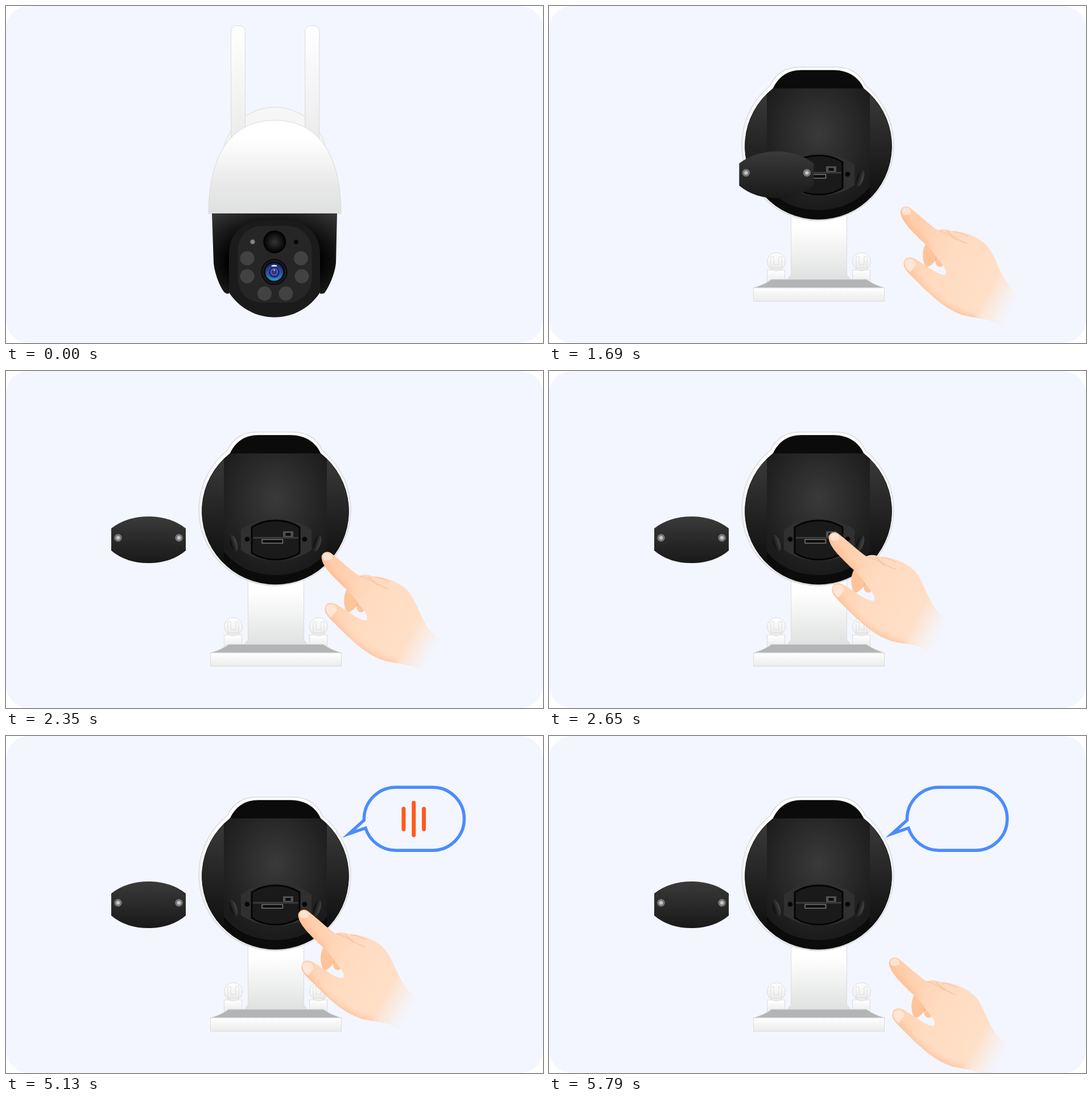
These frames come from a looping animation (944x593 px, 5.82 s). An HTML page:

```html
<!DOCTYPE html>
<html lang="en">
<head>
<meta charset="utf-8">
<title>Camera reset</title>
<style>
html, body { margin: 0; width: 100%; height: 100%; overflow: hidden; background: #fff; }
svg { display: block; width: 944px; height: 593px; }
</style>
</head>
<body>
<svg viewBox="0 0 944 593" fill="none">
  <defs>
    <linearGradient id="white" x2="0" y2="1"><stop stop-color="#fff"/><stop offset="1" stop-color="#ebebeb"/></linearGradient>
    <linearGradient id="dome" x2="0" y2="1"><stop offset=".2" stop-color="#fff"/><stop offset=".7" stop-color="#e8e8e8"/><stop offset="1" stop-color="#dfe1e0"/></linearGradient>
    <linearGradient id="hood" x2="0" y2="1"><stop offset=".3" stop-color="#fff"/><stop offset="1" stop-color="#ebebeb"/></linearGradient>
    <linearGradient id="neck" x2="0" y2="1"><stop offset=".2" stop-color="#fff"/><stop offset="1" stop-color="#dfe1e0"/></linearGradient>
    <linearGradient id="cover" x2="0" y2="1"><stop stop-color="#3a3a3a"/><stop offset="1" stop-color="#191919"/></linearGradient>
    <linearGradient id="side" x2="0" y2="1"><stop stop-color="#3b3b3b"/><stop offset=".9" stop-color="#0c0c0c"/></linearGradient>
    <linearGradient id="knob"><stop stop-color="#0b0b0b"/><stop offset="1" stop-color="#474747"/></linearGradient>
    <linearGradient id="screw"><stop stop-color="#8d8d8d"/><stop offset="1" stop-color="#dcdcdc"/></linearGradient>
    <linearGradient id="iris" x2="0" y2="1"><stop stop-color="#1d2460"/><stop offset=".5" stop-color="#27489a"/><stop offset="1" stop-color="#2b9ac8"/></linearGradient>
    <radialGradient id="shell" cy=".6" r=".8"><stop offset=".46" stop-color="#020202"/><stop offset="1" stop-color="#3c3c3c"/></radialGradient>
    <radialGradient id="glow"><stop offset=".3" stop-color="#2a2a2a"/><stop offset="1" stop-color="#2a2a2a" stop-opacity="0"/></radialGradient>
    <radialGradient id="sensor"><stop stop-color="#343434"/><stop offset="1" stop-color="#000"/></radialGradient>
    <radialGradient id="back" cy=".37" r=".62"><stop stop-color="#3a3a3a"/><stop offset="1" stop-color="#1b1b1b"/></radialGradient>
    <linearGradient id="skin" gradientUnits="userSpaceOnUse" x1="500" y1="350" x2="694" y2="453">
      <stop stop-color="#ffcfac"/><stop offset=".35" stop-color="#ffdbc0"/>
      <stop offset=".76" stop-color="#ffdfc7"/><stop offset="1" stop-color="#ffe6d4" stop-opacity="0"/>
    </linearGradient>
    <filter id="soft"><feGaussianBlur stdDeviation="5"/></filter>
    <clipPath id="inside"><path id="cavity" d="M394 145C404 124 420 113 444 113H500C524 113 544 124 553 145A129 129 0 1 1 394 145Z"/></clipPath>
    <path id="palm" d="M492 296C490 287 499 281 507 285C520 294 545 318 558 326C566 322 575 324 582 327C602 326 630 338 644 353C660 372 664 400 685 425L704 441L673 500C655 481 640 483 610 477C575 470 545 440 515 410C503 398 495 390 498 381C500 373 508 371 518 376C540 390 560 406 571 404C575 395 565 386 556 374C546 358 538 352 530 345C515 330 495 312 492 296Z"/>
    <clipPath id="palmClip"><use href="#palm"/></clipPath>
    <g id="lens">
      <circle r="22.5" fill="#101010" stroke="#000"/><circle r="20" stroke="#2b2b2b"/>
      <circle r="17" fill="#080b1a"/><circle r="15.500" fill="url(#iris)"/>
      <circle r="10.500" fill="#1f2d78" stroke="#3c68b8"/><circle r="5.500" fill="#2b2468" stroke="#7f6cc8" stroke-width="1.500"/>
      <circle r="3" fill="#2a3f9a"/><ellipse cy="-11" rx="5" ry="1.600" fill="#e9edff"/><circle cy="-3" r="1.200" fill="#d8ddff"/>
    </g>
  </defs>
  <rect width="944" height="593" rx="40" fill="#f3f6fe"/>
  <g id="front"></g>

  <g id="rear">
    <g stroke="#dadbde" fill="url(#white)">
      <path fill="url(#neck)" d="M425.500 365H523.500V473L531 482H418L425.500 473Z"/>
      <g id="bolt">
        <rect x="383.500" y="464.500" width="31" height="22"/><circle cx="399.500" cy="450" r="16"/>
        <path d="M390 441h5v14h9v-14h5v20h-19z"/>
      </g>
      <use href="#bolt" x="150"/>
      <path d="M359 496Q380 490 391 481H558Q570 490 590 496Z" fill="#b3b4b5"/>
      <rect x="359.500" y="496" width="230" height="23.500"/>
      <path stroke-width="1.500" d="M389 140C399 118 418 107.500 440 107.500H504C528 107.500 547 118 556 140A133.500 133.500 0 1 1 389 140Z"/>
    </g>
    <g clip-path="url(#inside)">
      <rect x="340" y="110" width="265" height="268" fill="#0b0b0b"/>
      <path d="M340 145H383V378H340ZM564 145H605V378H564Z" fill="url(#side)"/>
      <path d="M383 145H564V318Q530 359 473.500 359T383 318Z" fill="url(#back)"/>
    </g>
    <use href="#cavity" stroke="#000" stroke-opacity=".5"/>
    <ellipse rx="6" ry="15" transform="translate(400 303) rotate(-18)" fill="url(#knob)"/>
    <ellipse rx="6" ry="15" transform="translate(547 303) rotate(18)" fill="url(#knob)"/>
    <path d="M413 279Q440 259 475 259T537 279V315Q510 334 475 334T413 315Z" fill="#303030"/>
    <path d="M432 275Q450 263 474 263T516 275V320Q498 332 474 332T432 320Z" fill="#1a1a1a" stroke="#050505" stroke-width="3"/>
    <path d="M434 293.500H514" stroke="#383838" stroke-width="3"/>
    <rect x="450" y="296.500" width="36.500" height="6.500" fill="#0c0c0c" stroke="#777" stroke-width="1.500"/>
    <path d="M487 282h18v10h-18z" fill="#505050"/><path d="M491.500 285h9v5h-9z" fill="#0c0c0c"/>
    <g fill="#070707" stroke="#222"><circle cx="424" cy="296" r="4.500"/><circle cx="525" cy="296" r="4.500"/></g>
    <g id="lid">
      <path d="M185 277Q212 256 250.500 256T316 277V316Q290 338 250.500 338T185 316Z" fill="url(#cover)"/>
      <g fill="#c4c4c4" stroke="#777" stroke-width="3.500"><circle cx="197" cy="293.500" r="5"/><circle cx="304" cy="293.500" r="5"/></g>
    </g>
    <g id="bubble">
      <path d="M629.500 148A56 56 0 0 1 685 90.200H750A55.500 55.500 0 0 1 750 201.200H685A56 56 0 0 1 632 162L603 172Z" fill="#f3f6fe" stroke="#4a8cff" stroke-width="5.500" stroke-miterlimit="10"/>
      <path id="bars" stroke="#ff5a1f" stroke-width="7" stroke-linecap="round"/>
    </g>
    <g id="hand">
      <path d="M536 350C529 362 530 380 537 391Q547 388 553 379Q554 391 563 390Q570 386 570 375L555 350Z" fill="#fdc49b"/>
      <path d="M553 379Q557 371 555 365" stroke="#f3a878"/>
      <use href="#palm" fill="url(#skin)"/>
      <g clip-path="url(#palmClip)">
        <path d="M492 290Q500 320 540 353M497 385C520 420 560 470 625 482" stroke="#ffb688" stroke-width="10" opacity=".65" filter="url(#soft)"/>
      </g>
      <path d="M558 326Q576 330 590 343M574 327Q590 343 609 349M584 328Q600 330 611 337" stroke="#f5b890" stroke-width="1.200" opacity=".8"/>
      <path d="M494 291Q497 284 505 286Q513 291 509 297L501 299Q494 299 494 291Z" fill="#ffe3d1"/>
      <path d="M499 382Q502 375 510 376Q520 379 518 388L509 399Q500 394 499 382Z" fill="#ffe6d5"/>
    </g>
  </g>
</svg>
<script>
const LOOP = 5820, STEP = 30;
const $ = id => document.getElementById(id);
const show = (id, on) => $(id).setAttribute('display', on ? 'inline' : 'none');
const move = (id, x, y) => $(id).setAttribute('transform', `translate(${x} ${y})`);

// Camera head seen from the front; k tilts it from level (0) to raised (1).
function camera(k, antennaTop) {
  const mix = (a, b) => a + (b - a) * k;
  const rimY = mix(365, 332), rimR = 75 * k, rimEnd = .342 * rimR;
  const top = mix(201, 180), hem = mix(365, 335), tip = mix(506, 455), hip = mix(452, 405);
  const faceTop = mix(377, 293), faceSide = mix(435, 350), chin = mix(504, 445.5), shade = mix(27, 4);
  const left = mix(362, 363.5), right = mix(582, 581.5), cheek = mix(392, 394), r = mix(95, 96.6);
  const arc = (dy, large) => `M${left} ${rimY + dy}A116 ${rimR} 0 ${large} 1 ${right} ${rimY + dy}`;
  const antenna = x => `<rect x="${x}" y="${antennaTop}" width="25" height="${mix(242, 225) - antennaTop}" rx="10" fill="url(#white)"/>`;
  const leds = [
    [424, 444, 434.5, 333.5], [518.5, 444, 507, 333.5], [424, 475.5, 432.5, 358],
    [520, 475.5, 509.5, 358], [454.5, 506, 457, 383.5], [492, 506, 488, 383.5]
  ].map(([x, y, u, v]) => `<circle cx="${mix(x, u)}" cy="${mix(y, v)}" r="${mix(12.5, 10)}"/>`).join('');
  const dotY = mix(415, 312.5);
  const plate = k < 1 ? '' : `
    <path d="M373 430C374 470 378 500 412 501Q472 503 532 501C566 500 571 470 572 430Z" fill="#d6d6d7"/>
    <path d="M373 430C374 462 382 484 412 486Q472 489 532 486C562 484 571 462 572 430Z" fill="#f2f2f2"/>
    <circle cx="405" cy="464" r="5" fill="url(#screw)"/><circle cx="541" cy="464" r="5" fill="url(#screw)"/>`;
  return `
    <g stroke="#d9dadd">
      ${k < 1 ? `<circle cx="472.5" cy="${270 + 100 * k}" r="92" fill="#f6f6f6"/>` : ''}
      ${antenna(395.5)}${antenna(525.8)}
    </g>${plate}
    <path d="M356 ${hem}C356 ${mix(268, 240)} 392 ${top} 472.500 ${top}S589 ${mix(268, 240)} 589 ${hem}Z" fill="url(#${k < 1 ? 'dome' : 'hood'})" stroke="#d9dadd"/>
    ${k ? `<path d="${arc(rimEnd, 1)}" stroke="#8e9092" stroke-width="3.500"/>` : ''}
    <path d="${arc(-rimEnd, 0)}L580 ${hip}C578 ${hip + 20} 568 ${tip - 12} 560 ${tip - 1}Q556 ${tip + 1} 552 ${tip}V${faceSide}H${cheek}V${tip}Q388 ${tip + 1} 384 ${tip - 2}C376 ${tip - 12} 367 ${hip + 20} 365 ${hip}Z" fill="url(#shell)"/>
    ${k ? `<path d="${arc(-rimEnd, 0)}" stroke="#8e9092" stroke-width="3"/>` : ''}
    <path d="M${cheek} ${faceSide}C${cheek} ${faceSide - 35} 420 ${faceTop} 450 ${faceTop}H494C525 ${faceTop} 552 ${faceSide - 35} 552 ${faceSide}V${chin}A${r} ${r} 0 0 1 ${cheek} ${chin}Z" fill="rgb(${shade},${shade},${shade})"/>
    ${k < 1 ? '' : '<ellipse cx="472" cy="385" rx="72" ry="58" fill="url(#glow)"/>'}
    <rect x="407.500" y="${mix(387, 295.5)}" width="${mix(130, 127.5)}" height="${mix(135, 103)}" rx="42" ry="${mix(42, 40)}" fill="#262626"/>
    <ellipse cx="472.300" cy="${mix(415, 318.5)}" rx="20" ry="${mix(20, 17.5)}" fill="url(#sensor)"/>
    <circle cx="433.500" cy="${dotY}" r="4" fill="#858585" stroke="#5d5d5d"/>
    <circle cx="510" cy="${dotY}" r="4" fill="#080808"/>
    <g fill="#424242">${leds}</g>
    <use href="#lens" transform="translate(${mix(471.5, 472.7)} ${mix(468, 355.5)}) scale(${mix(1, .88)} ${mix(1, .73)})"/>
    ${k < 1 ? '' : '<path d="M435 462Q473 475 512 462Q473 472 435 462" fill="#444"/>'}`;
}

const poses = [camera(0, 34.5), camera(.2, 51.5), camera(1, 91.5)];
const beats = [3980, 4210, 4440, 4670, 4900, 5130, 5350, 5560];
const halves = [32, 21.5, 11, 7];

// Level n shows the middle bar and n - 1 pairs around it.
function barPath(n) {
  let d = '';
  for (let i = 0; i < n; i++)
    for (const side of [-1, 1]) {
      const h = halves[i] - 3.5;
      d += `M${716.8 + side * i * 17.8} ${146 - h}v${2 * h}`;
    }
  return d;
}

const ramp = (t, from, to) =>
  Math.min(1, Math.max(0, Math.floor((t - from) / STEP) * STEP / (to - from)));

let pose = -1;
function draw(t) {
  const rear = t >= 1510;
  show('front', !rear);
  show('rear', rear);
  if (!rear) {
    const next = t < 500 ? 0 : t < 1000 ? 1 : 2;
    if (next !== pose) $('front').innerHTML = poses[pose = next];
    return;
  }
  move('lid', 224 * (1 - ramp(t, 1510, 2050)), 0);
  const away = 1 - ramp(t, 2050, 2650), leave = ramp(t, 5040, 5475);
  move('hand', 126 * away + 106 * leave, 69 * away + 106 * leave);
  show('bubble', t >= 3650);
  const beat = beats.filter(b => t >= b).length;
  $('bars').setAttribute('d', beat && t < 5790 ? barPath((beat - 1) % 4 + 1) : '');
}

const start = performance.now();
function tick() {
  draw((performance.now() - start) % LOOP);
  requestAnimationFrame(tick);
}
tick();
</script>
</body>
</html>
```
